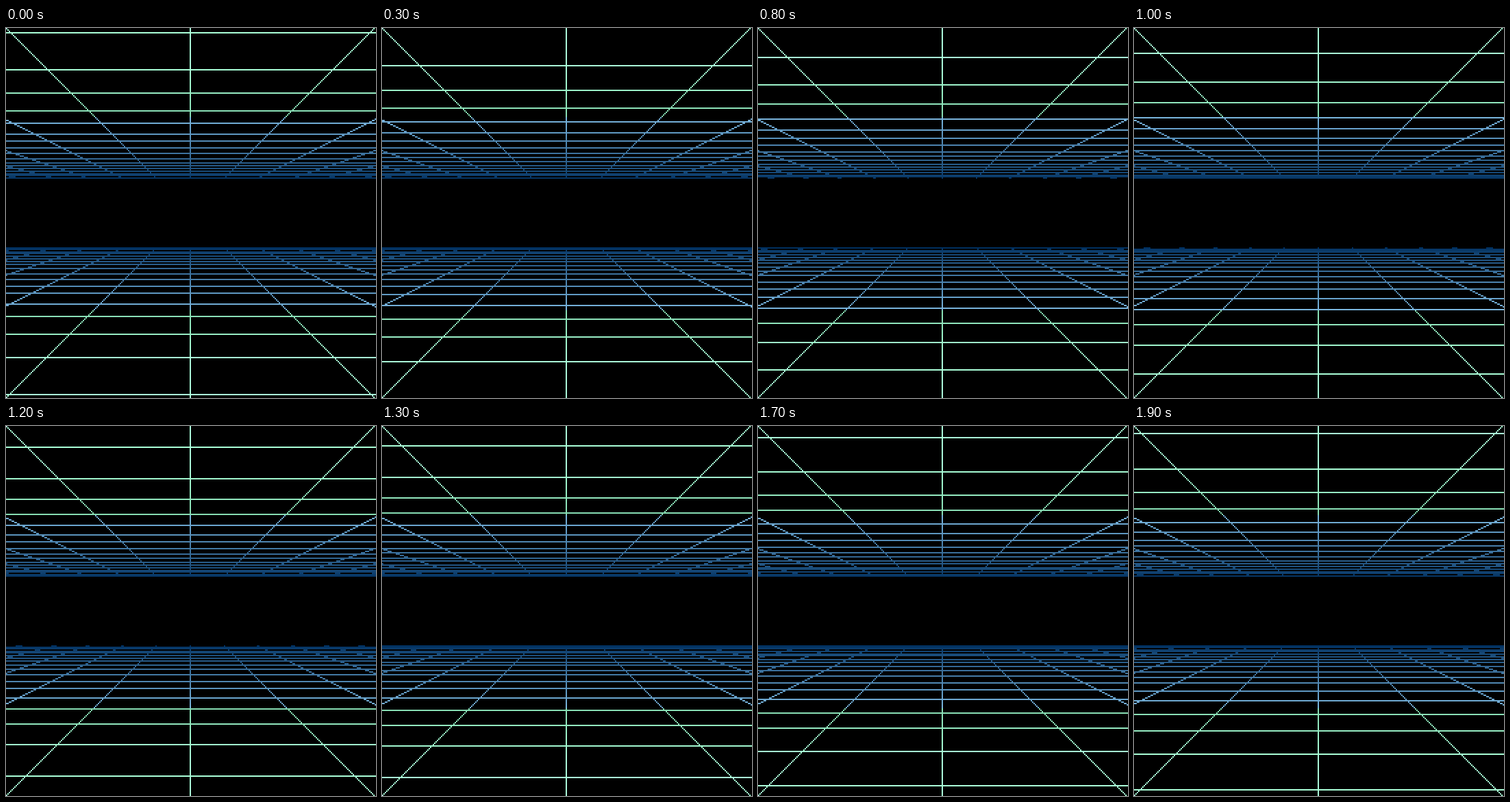
Animation, 540 px wide and 540 px high, one loop 2 s. Source, as an HTML page with a canvas:

```html
<!DOCTYPE html>
<html lang="en">
<head>
<meta charset="utf-8">
<title>Endless grid</title>
<style>
  html, body { margin: 0; width: 100%; height: 100%; overflow: hidden; background: #000; }
  canvas { display: block; width: 540px; height: 540px; }
</style>
</head>
<body>
<canvas id="stage" width="540" height="540"></canvas>
<script>
const ctx = document.getElementById('stage').getContext('2d');
ctx.scale(2, 2); // everything is laid out on 270 x 270 chunky pixels

const SIZE = 270, HORIZON = 135, CENTER = 134, GAP = 25;
const DEPTH = 526.5, ROUNDING = 0.39; // distance from horizon = DEPTH / z
const NEAR = 4, FAR = 22, SPOKES = 5;
const STEP_MS = 100, STEPS = 20;
const GREEN_FROM = 71;

const NAVY = [0, 48, 96], SKY = [124, 184, 224];
const GREEN = [134, 220, 178], MINT = [170, 255, 216];

const mix = (a, b, t) => `rgb(${a.map((v, i) => Math.round(v + (b[i] - v) * t))})`;

// Blue fades in from the horizon, then switches to green close to the viewer.
function shade(d) {
  if (d >= GREEN_FROM) return mix(GREEN, MINT, Math.min(1, (d - GREEN_FROM) / 35));
  return mix(NAVY, SKY, ((d - GAP) / (GREEN_FROM - GAP)) ** 0.8);
}

function bar(x, row, width) {
  const hidden = row >= HORIZON - GAP && row < HORIZON + GAP;
  if (hidden || row < 0 || row >= SIZE) return;
  ctx.fillStyle = shade(Math.abs(row - HORIZON));
  ctx.fillRect(x, row, width, 1);
}

// Spoke k moves k pixels sideways per row, so it is a dash k pixels wide.
function drawSpokes() {
  for (let row = 0; row < SIZE; row++) {
    const spread = row < HORIZON ? CENTER - row : row - HORIZON;
    bar(CENTER, row, 1);
    for (let k = 1; k <= SPOKES; k++) {
      const inner = k * spread - Math.floor(k / 2);
      bar(CENTER + inner, row, k);
      bar(CENTER - inner - k + 1, row, k);
    }
  }
}

function drawRungs(phase) {
  for (let n = NEAR; n <= FAR; n++) {
    const d = Math.floor(DEPTH / (n - phase) + ROUNDING);
    bar(0, HORIZON - d, SIZE);
    bar(0, HORIZON + d, SIZE);
  }
}

let shown = -1;
const start = performance.now();

function render(now) {
  const step = Math.floor(Math.max(0, now - start) / STEP_MS) % STEPS;
  if (step !== shown) {
    shown = step;
    ctx.fillStyle = '#000';
    ctx.fillRect(0, 0, SIZE, SIZE);
    drawSpokes();
    drawRungs(step / STEPS);
  }
  requestAnimationFrame(render);
}
render(start);
</script>
</body>
</html>
```
